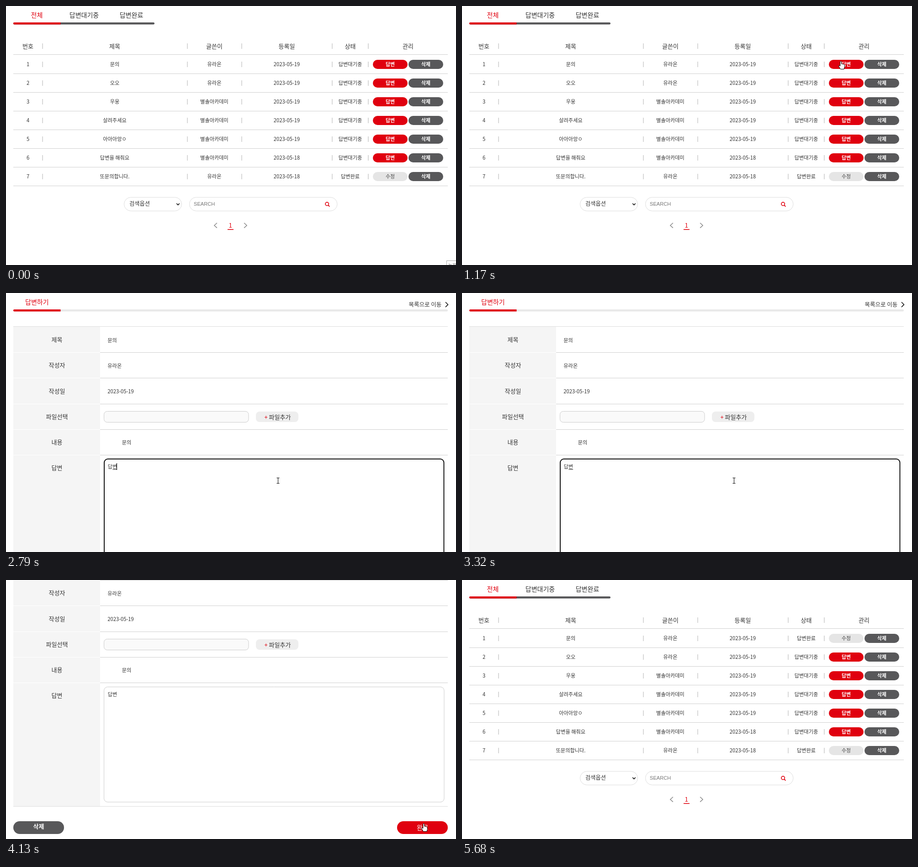
An HTML page with a canvas that plays this animation: 985x568 px, repeating every 6280 ms.

```html
<!DOCTYPE html>
<html lang="ko">
<head>
<meta charset="utf-8">
<title>문의 게시판</title>
<style>
html, body { margin: 0; width: 100%; height: 100%; overflow: hidden; background: #fff; }
canvas { display: block; }
</style>
</head>
<body>
<canvas id="stage" width="985" height="568"></canvas>
<script>
const ctx = document.getElementById('stage').getContext('2d');
const LOOP = 6280;
const RED = '#e0000f', DARK = '#58585a', INK = '#333', LINE = '#cfcfcf';
const SANS = '"Noto Sans CJK KR", "Noto Sans", sans-serif';

const ROWS = [
  ['문의', '유라온', 19], ['오오', '유라온', 19], ['우웅', '별솔아카데미', 19],
  ['살려주세요', '별솔아카데미', 19], ['아아아앙ㅇ', '별솔아카데미', 19],
  ['답변을 해줘요', '별솔아카데미', 18], ['또문의합니다.', '유라온', 18]
];
const COLUMNS = [48, 238, 456, 614.5, 753.5, 880];
const KEYS = [[1790, ''], [2190, 'ㄷ'], [2390, '다'], [2460, '답'],
  [2590, '답ㅂ'], [2660, '답벼'], [2790, '답변']];
const PATH = [
  [70, 972, 568], [200, 935, 450], [400, 862, 240], [630, 822, 133], [700, 822, 131],
  [970, 829, 121], [1240, 829, 121], [1720, 595, 411], [3600, 595, 411], [3860, 914, 534],
  [4200, 914, 534], [4540, 714, 237], [4940, 714, 237], [5070, 698, 268],
  [5540, 899, 553], [5610, 920, 561], [5670, 940, 590]
];
const ARROW = new Path2D('M0 0V13L3 10.3L5.2 15L7.3 14L5.2 9.6H9Z');
const HAND = new Path2D('M-1.7 10V.8Q-.2-1.6 1.3.8V5.6Q2.8 4.8 3.8 6.2Q5.3 5.4 6 7Q8 6.4 8 9V12L6.6 17H-1L-4.8 10.8Q-5.2 8.6-3.2 9.2Z');
const BEAM = new Path2D('M-3-6H3M0-6V6M-3 6H3');

// y is the optical middle of the glyphs
function text(s, x, y, size, { color = INK, align = 'center', weight = 400, font = SANS } = {}) {
  ctx.font = `${weight} ${size}px ${font}`;
  ctx.textAlign = align;
  ctx.fillStyle = color;
  ctx.fillText(s, x, y + size * 0.37);
}

function rect(x, y, w, h, color) {
  ctx.fillStyle = color;
  ctx.fillRect(x, y, w, h);
}

function box(x, y, w, h, r, fill, stroke, width = 1) {
  ctx.beginPath();
  ctx.roundRect(x, y, w, h, r);
  if (fill) { ctx.fillStyle = fill; ctx.fill(); }
  if (stroke) { ctx.strokeStyle = stroke; ctx.lineWidth = width; ctx.stroke(); }
}

function line(color, width, ...points) {
  ctx.beginPath();
  points.forEach(([x, y]) => ctx.lineTo(x, y));
  ctx.strokeStyle = color;
  ctx.lineWidth = width;
  ctx.stroke();
}

const rowY = i => 127.7 + 41.08 * i;

function pill(label, x, y, fill, color = '#fff', weight = 700) {
  box(x, Math.round(y - 10), 76, 20, 10, fill);
  text(label, x + 38, y, 10.9, { color, weight });
}

function drawList(firstAnswered) {
  box(16, 36, 309, 4.4, 2.2, DARK);
  box(16, 36, 103.5, 4.4, [2.2, 0, 0, 2.2], RED);
  text('전체', 67.5, 20, 14, { color: RED });
  text('답변대기중', 171, 20, 14);
  text('답변완료', 274.5, 20, 14);

  ['번호', '제목', '글쓴이', '등록일', '상태', '관리']
    .forEach((s, i) => text(s, COLUMNS[i], 88, 13));
  for (let i = 0; i < 8; i++) {
    rect(16, Math.floor(106.9 + 41.14 * i), 951, 1, LINE);
    const y = i ? rowY(i - 1) : 87.7;
    [79.4, 396.4, 515.4, 713.4, 792.4].forEach(x => rect(x, Math.round(y - 6), 1.2, 12, '#bdbdbd'));
  }

  ROWS.forEach(([title, writer, day], i) => {
    const y = rowY(i), answered = i === 6 || (i === 0 && firstAnswered);
    [i + 1, title, writer, `2023-05-${day}`, answered ? '답변완료' : '답변대기중']
      .forEach((s, c) => text(s, COLUMNS[c], y, 11.2));
    if (answered) pill('수정', 803, y, '#e5e5e5', '#444', 400);
    else pill('답변', 803, y, RED);
    pill('삭제', 881, y, DARK);
  });

  box(258.5, 419.5, 126, 30, 15, '#fff', '#ddd');
  text('검색옵션', 270, 433.7, 12.2, { align: 'left', weight: 300 });
  line('#111', 1.7, [373.3, 433], [376.5, 436.3], [379.7, 433]);
  box(401.5, 419.5, 323.5, 30, 15, '#fff', '#ddd');
  text('SEARCH', 411, 434.3, 11.1,
    { color: '#757575', align: 'left', font: '"Liberation Sans", Arial, sans-serif' });
  box(699, 430.4, 7.4, 7.4, 3.7, null, RED, 1.6);
  line(RED, 1.8, [705.3, 436.8], [708.4, 439.8]);

  line('#888', 1.5, [461.8, 475.8], [456, 481.2], [461.8, 486.6]);
  line('#888', 1.5, [521.2, 475.8], [527, 481.2], [521.2, 486.6]);
  text('1', 491.3, 481.3, 13.5, { color: RED });
  rect(485, 489.4, 13, 1.6, RED);
}

function drawReply(t) {
  const key = KEYS.findLast(([at]) => at <= t);
  const focused = key && t < 3990;
  const typed = key ? key[1] : '';
  if (focused) box(215, 364, 743.5, 253, 8, '#fff', '#111', 2);
  else box(214.5, 364.5, 744.5, 252.5, 8, '#fff', '#ccc');
  text(typed, 222.8, 380.7, 11.1, { align: 'left' });
  if (!focused) return;
  const end = 222.8 + 10.2 * typed.length;
  if (typed) rect(end - 10, 386.5, 10, 1, INK);
  if ((t - key[0]) % 1060 < 530) rect(Math.floor(end - 0.5), 373, 1, 15, '#000');
}

function drawForm(t, scroll) {
  ctx.save();
  ctx.translate(0, -scroll);
  box(16, 36, 951, 4.4, 2.2, '#e9e9e9');
  box(16, 36, 103.5, 4.4, [2.2, 0, 0, 2.2], RED);
  text('답변하기', 67.8, 20, 14, { color: RED });
  text('목록으로 이동', 953.3, 25, 12.5, { align: 'right' });
  line('#222', 1.7, [962, 20], [967.4, 25.4], [962, 30.8]);

  rect(16, 73, 951, 1, '#ddd');
  rect(16, 74, 190, 552, '#f5f5f5');
  rect(16, 626, 951, 1, '#ddd');
  ['제목', '작성자', '작성일', '파일선택', '내용', '답변'].forEach((s, i) => {
    text(s, 111.5, 102.4 + 56.2 * i, 13);
    if (!i) return;
    const y = Math.floor(74.2 + 56.3 * i);
    rect(16, y, 190, 1, '#fff');
    rect(206, y, 761, 1, LINE);
  });

  const left = { align: 'left' };
  text('문의', 222.3, 103.6, 11.2, left);
  text('유라온', 222.3, 159.6, 11.2, left);
  text('2023-05-19', 222.3, 216, 11.2, left);
  text('문의', 253.8, 328.3, 11.2, left);
  box(214.5, 259.5, 316.5, 24, 7, '#fafafa', '#ccc');
  box(547, 260, 93, 23, 8, '#eee');
  text('+', 569, 272.3, 13, { color: RED });
  text('파일추가', 575.5, 272.5, 13, left);
  drawReply(t);

  box(16, 659, 111, 28, 14, DARK);
  text('삭제', 71.5, 670.6, 13, { color: '#fff', weight: 700 });
  box(856, 659, 111, 28, 14, RED);
  text('완료', 911.7, 672.6, 13.5, { color: '#fff' });
  ctx.restore();
}

function pointer(t) {
  const i = PATH.findIndex(([at]) => at > t);
  if (i < 1) return null;
  const [t0, x0, y0] = PATH[i - 1], [t1, x1, y1] = PATH[i];
  const p = (t - t0) / (t1 - t0);
  return [x0 + (x1 - x0) * p, y0 + (y1 - y0) * p];
}

function pointerShape(page, x, y, scroll) {
  const over = (l, top, w, h) => x >= l && x <= l + w && y >= top && y <= top + h;
  if (page === 'list') {
    const onButton = ROWS.some((_, i) =>
      over(803, rowY(i) - 10, 76, 20) || over(881, rowY(i) - 10, 76, 20));
    return onButton ? HAND : ARROW;
  }
  if (page === 'form') {
    if (over(214, 364 - scroll, 745, 253)) return BEAM;
    if (over(856, 659 - scroll, 111, 28)) return HAND;
  }
  return ARROW;
}

function drawPointer(page, t, scroll) {
  const at = pointer(t);
  if (!at) return;
  const shape = pointerShape(page, ...at, scroll);
  ctx.save();
  ctx.translate(Math.round(at[0]) + 0.5, Math.round(at[1]) + 0.5);
  ctx.lineWidth = 1;
  ctx.strokeStyle = '#000';
  ctx.fillStyle = '#fff';
  if (shape !== BEAM) ctx.fill(shape);
  ctx.stroke(shape);
  ctx.restore();
}

function draw(t) {
  const page = t < 1310 || t >= 4670 ? 'list' : t < 4400 ? 'form' : 'blank';
  const p = Math.min(1, Math.max(0, (t - 3360) / 200));
  const scroll = Math.round(130 * (1 - (1 - p) ** 3));
  rect(0, 0, 985, 568, '#fff');
  if (page === 'list') drawList(t >= 4670);
  if (page === 'form') drawForm(t, scroll);
  if (t < 70) {
    box(964.5, 558.5, 40, 20, 0, '#fff', '#aaa');
    text('녹화', 968, 569, 10, { color: '#666', align: 'left' });
  }
  drawPointer(page, t, scroll);
}

const start = performance.now();
function tick() {
  draw((performance.now() - start) % LOOP);
  requestAnimationFrame(tick);
}
tick();
</script>
</body>
</html>
```
